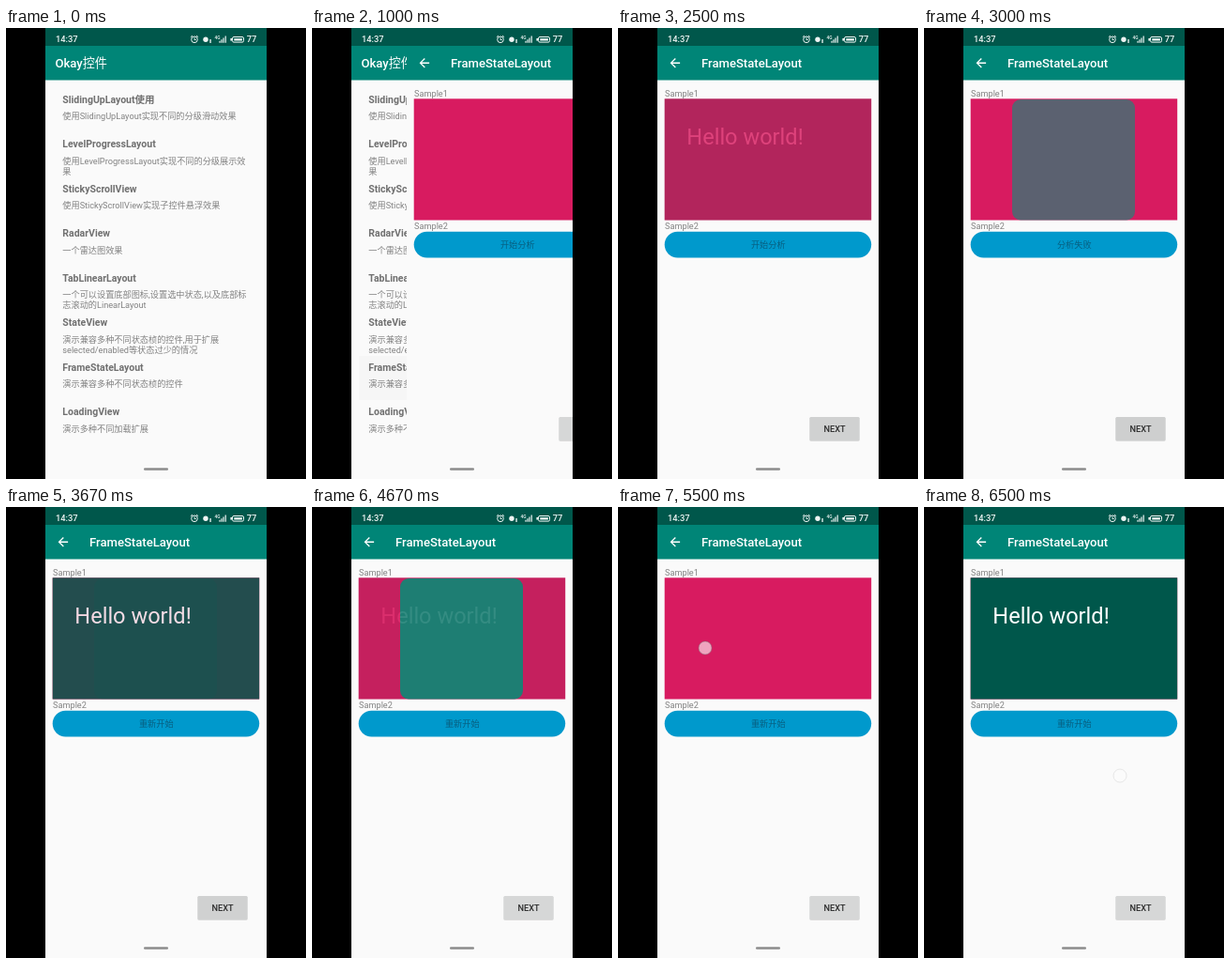
Recreate the animation shown at these times as an HTML page. Size 320x480 px, loop 6.67 s.

```html
<!DOCTYPE html>
<html lang="zh">
<head>
<meta charset="utf-8">
<title>FrameStateLayout</title>
<style>
  html, body { margin: 0; width: 100%; height: 100%; overflow: hidden; background: #000; }
  svg { display: block; width: 100vw; height: 100vh; }
  text { font: 9.18px Roboto, "Noto Sans CJK SC", "Noto Sans CJK", sans-serif; fill: #828282; white-space: pre; }
  .title { font-size: 10.5px; font-weight: 700; fill: #707070; }
  .bar { font-size: 13.1px; font-weight: 500; fill: #fff; }
  .status { font-size: 9.3px; font-weight: 500; fill: #f0f5f4; }
  .hello { font-size: 23.6px; fill: #fff; }
  .next { font-weight: 500; fill: #2c2c2c; text-anchor: middle; }
  .state { fill: #075f80; text-anchor: middle; }
</style>
</head>
<body>
<svg viewBox="0 0 320 480">
  <defs>
    <clipPath id="phone"><rect x="42" width="236" height="480"/></clipPath>
  </defs>
  <rect width="320" height="480"/>
  <g clip-path="url(#phone)">
    <rect x="42" width="236" height="480" fill="#fafafa"/>

    <g id="list">
      <rect x="42" y="19" width="236" height="36.5" fill="#008577"/>
      <text class="bar" x="52.5" y="42">Okay控件</text>
      <rect id="ripple" x="50" y="349" width="220" height="47" fill="#777" opacity="0"/>
    </g>

    <g id="page">
      <rect x="42" width="236" height="480" fill="#fafafa"/>
      <rect x="42" y="19" width="236" height="36.5" fill="#008577"/>
      <path transform="translate(53 29.4) scale(.656)" fill="#fff"
        d="M20 11H7.8l5.6-5.6L12 4l-8 8 8 8 1.4-1.4L7.8 13H20z"/>
      <text class="bar" x="89" y="42">FrameStateLayout</text>
      <text x="50" y="73">Sample1</text>
      <rect x="49.7" y="75.3" width="220.5" height="129.2" fill="#d81b60"/>
      <rect id="tile" x="94" y="76" width="131" height="128.5" rx="9" fill="#118c7a"/>
      <g id="hello">
        <rect x="49.7" y="75.3" width="220.5" height="129.2" fill="#00574b"/>
        <text class="hello" x="73.3" y="123.7">Hello world!</text>
      </g>
      <text x="50" y="214.4">Sample2</text>
      <rect x="49.7" y="216.7" width="220.5" height="27.8" rx="13.9" fill="#0099cc"/>
      <text id="state" class="state" x="160.3" y="234.3"></text>
      <rect x="204.5" y="414.8" width="53" height="25" rx="1.3" fill="#777" opacity=".3"/>
      <rect x="204.5" y="414" width="53" height="25" rx="1.3" fill="#d6d7d7"/>
      <rect id="press" x="204.5" y="414" width="53" height="25" rx="1.3" fill="#777"/>
      <text class="next" x="231" y="429.6">NEXT</text>
    </g>

    <rect x="42" width="236" height="19" fill="#00574b"/>
    <text class="status" x="53" y="15.4">14:37</text>
    <g fill="none" stroke="#f0f5f4">
      <circle cx="201" cy="12.3" r="3.3"/>
      <path d="M201 10.3V12.5H202.7M196.9 9.8L199 8M205.1 9.8L203 8" stroke-width=".9"/>
      <rect x="241.5" y="9.5" width="12" height="5.6" rx="1.5"/>
      <path d="M228 15.8v-2M230 15.8v-3.6M232 15.8v-5.4M234.2 15.8V8.6" stroke-width="1.2"/>
    </g>
    <g fill="#f0f5f4">
      <circle cx="213" cy="12.3" r="2.7"/>
      <rect x="217.4" y="12" width="1.3" height="4"/>
      <rect x="239.4" y="11" width="1.6" height="2.6"/>
      <rect x="243.3" y="11.2" width="8.6" height="2.3"/>
    </g>
    <text class="status" x="222.5" y="12" style="font-size:4.8px">4G</text>
    <text class="status" x="256.8" y="15.4">77</text>
    <rect x="147" y="468.3" width="26" height="2.4" rx="1.2" fill="#8c8c8c"/>

    <circle id="touch" r="7" fill="#fff" fill-opacity=".6" stroke="#777" stroke-opacity=".45"/>
  </g>
</svg>
<script>
const LOOP = 6670, RATE = 6, FADE = 2.4;
const $ = id => document.getElementById(id);
const clamp = v => Math.min(1, Math.max(0, v));

function addText(x, y, content, cls = '') {
  const el = document.createElementNS('http://www.w3.org/2000/svg', 'text');
  el.setAttribute('x', x);
  el.setAttribute('y', y);
  el.setAttribute('class', cls);
  el.textContent = content;
  $('list').append(el);
}

const rows = [
  ['SlidingUpLayout使用', '使用SlidingUpLayout实现不同的分级滑动效果'],
  ['LevelProgressLayout', '使用LevelProgressLayout实现不同的分级展示效', '果'],
  ['StickyScrollView', '使用StickyScrollView实现子控件悬浮效果'],
  ['RadarView', '一个雷达图效果'],
  ['TabLinearLayout', '一个可以设置底部图标,设置选中状态,以及底部标', '志滚动的LinearLayout'],
  ['StateView', '演示兼容多种不同状态桢的控件,用于扩展', 'selected/enabled等状态过少的情况'],
  ['FrameStateLayout', '演示兼容多种不同状态桢的控件'],
  ['LoadingView', '演示多种不同加载扩展']
];
rows.forEach(([title, ...lines], i) => {
  const y = 79.6 + i * 47.5;
  addText(60.3, y, title, 'title');
  lines.forEach((line, k) => addText(60.3, y + 17.8 + k * 10.8, line));
});

// Panel states cycle: 0 empty, 1 picture, 2 greeting.
// NEXT steps forward, a tap on the panel steps back.
const labels = ['开始分析', '分析失败', '重新开始'];
const spots = {
  row: { x: 150, y: 372, step: 0 },
  next: { x: 244, y: 437, step: 1 },
  panel: { x: 93, y: 150, step: -1 },
  blank: { x: 209, y: 286, step: 0 }
};
const tap = (spot, ...ticks) => ticks.map(at => ({ at, spot: spots[spot] }));
const taps = [
  ...tap('row', 2.5),
  ...tap('next', 9, 11, 13, 16.5, 20),
  ...tap('panel', 25.8, 30, 33),
  ...tap('blank', 38.2)
];

function render(tick) {
  let state = 0, before = 0, mix = 1, label = 0, press = 0, touch = 0;
  for (const { at, spot } of taps) {
    const age = tick - at;
    if (age > -1 && age < 1.2) {
      touch = clamp(1 - age / 1.2);
      $('touch').setAttribute('transform', `translate(${spot.x} ${spot.y})`);
    }
    if (spot === spots.next && age >= 0) press = .11 * clamp(1 - age / 5);
    if (age <= 0 || !spot.step) continue;
    before = state;
    state = (state + spot.step + 3) % 3;
    mix = clamp(age / FADE);
    if (spot === spots.next) label = state;
  }
  const weight = s => (s === state ? mix : 0) + (s === before ? 1 - mix : 0);
  const slide = 236 * (1 - clamp((tick - 4) / 4)) ** 2;

  $('page').setAttribute('transform', `translate(${slide} 0)`);
  $('ripple').setAttribute('opacity', tick > 2 ? .12 * clamp(1 - (tick - 3) / 4) : 0);
  $('tile').setAttribute('opacity', weight(1));
  $('hello').setAttribute('opacity', weight(2));
  $('press').setAttribute('opacity', press);
  $('touch').setAttribute('opacity', touch);
  $('state').textContent = labels[label];
}

const start = performance.now();
function loop() {
  const time = (performance.now() - start) % LOOP;
  render(Math.min(39, Math.floor(time * RATE / 1000 + .05)));
  requestAnimationFrame(loop);
}
loop();
</script>
</body>
</html>
```
